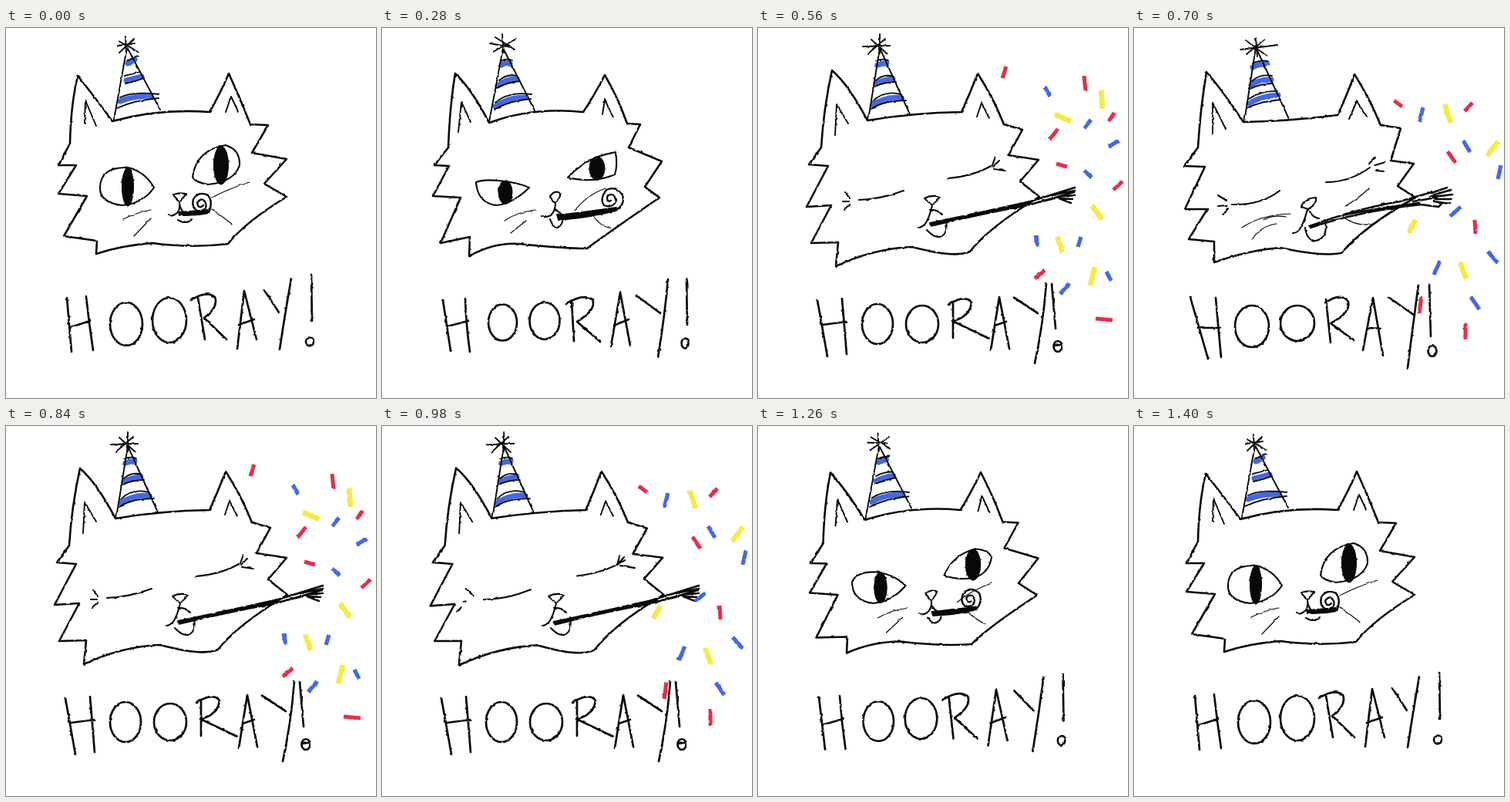
Animation, 480 px wide and 480 px high, one loop 1.54 s. Source, as an HTML page:

```html
<!DOCTYPE html>
<html lang="en">
<head>
<meta charset="utf-8">
<title>Hooray!</title>
<style>
html, body { margin: 0; width: 100%; height: 100%; overflow: hidden; background: #fff; }
svg { display: block; width: 100%; height: 100%; }
path { fill: none; stroke: #080808; stroke-linecap: round; stroke-linejoin: round; }
.head { stroke-width: 2.6; }
.hat, .ears { stroke-width: 1.9; }
.bands { stroke: #4468e6; stroke-width: 7; }
.lines { stroke-width: 1.8; }
.eyes, .face { stroke-width: 2.1; }
.pupils { fill: #080808; stroke-width: 1; }
.whiskers { stroke-width: 1.2; }
.horn { fill: #080808; stroke-width: 1.8; }
.curl { stroke-width: 2.3; }
.tassel { stroke-width: 2.5; }
.word { stroke-width: 2.7; }
.red { stroke: #ec2c46; stroke-width: 5; }
.blue { stroke: #4169ec; stroke-width: 5.2; }
.yellow { stroke: #f7ea42; stroke-width: 6.8; }
.red, .blue, .yellow { stroke-linecap: butt; }

/* Six poses play forwards and back, 140 ms each */
g { visibility: hidden; filter: url(#ink); animation: 1540ms step-end infinite; }
g:nth-of-type(1) { animation-name: rest; }
g:nth-of-type(2) { animation-name: wake; }
g:nth-of-type(3) { animation-name: squint; }
g:nth-of-type(4) { animation-name: blow; }
g:nth-of-type(5) { animation-name: party; }
g:nth-of-type(6) { animation-name: peak; }
@keyframes rest { 0%, 90.9% { visibility: visible } 9.09%, 100% { visibility: hidden } }
@keyframes wake { 0%, 18.18%, 90.9%, 100% { visibility: hidden } 9.09%, 81.81% { visibility: visible } }
@keyframes squint { 0%, 27.27%, 81.81%, 100% { visibility: hidden } 18.18%, 72.72% { visibility: visible } }
@keyframes blow { 0%, 36.36%, 72.72%, 100% { visibility: hidden } 27.27%, 63.63% { visibility: visible } }
@keyframes party { 0%, 45.45%, 63.63%, 100% { visibility: hidden } 36.36%, 54.54% { visibility: visible } }
@keyframes peak { 0%, 54.54%, 100% { visibility: hidden } 45.45% { visibility: visible } }
</style>
</head>
<body>
<svg viewBox="0 0 480 480" role="img" aria-label="A party cat: HOORAY!">
  <filter id="ink" filterUnits="userSpaceOnUse" x="0" y="0" width="480" height="480" color-interpolation-filters="sRGB">
    <feTurbulence type="fractalNoise" baseFrequency="0.15" numOctaves="2" seed="4" result="noise"/>
    <feDisplacementMap in="SourceGraphic" in2="noise" scale="2.5" xChannelSelector="R" yChannelSelector="G"/>
  </filter>
</svg>
<script>
const oval = (x, y, rx, ry) =>
  `M${x} ${y - ry}a${rx} ${ry} 0 0 0 0 ${2 * ry}a${rx} ${ry} 0 0 0 0 ${-2 * ry}`;

const rest = {
  head: 'M93 62Q84 100 83 150L68 178L91 178L68 215L105 218L75 270L118 276L117 293Q150 282 190 279Q240 286 288 280Q310 252 364 219L335 202L364 170L319 162L340 126L317 125Q303 90 289 59Q278 85 264 109Q200 104 138 121Q114 88 93 62',
  bands: 'M158 46Q163 44 167 41M156 68Q165 66 176 63M148 95Q165 88 188 88',
  lines: 'M157 42Q163 40 171 37M154 62Q163 60 174 57M155 72Q167 70 179 65M148 90Q165 82 198 86M144 104Q165 94 198 91',
  hat: 'M140 119L157 25L200 106M155 11L156 33M146 17L172 31M166 14L147 32M145 23L167 20',
  ears: 'M102 124L103 94L117 127M285 109L292 89L301 108',
  eyes: 'M122 205Q124 180 158 181Q180 186 192 207Q178 228 150 230Q120 226 122 205M242 193Q247 158 285 152Q304 158 303 178Q296 200 262 203Q245 200 242 193',
  pupils: oval(158, 206, 7.5, 25) + oval(279, 178, 9.5, 25),
  whiskers: 'M152 248Q168 240 187 236M166 270L188 247M267 220Q290 208 316 200M267 235Q280 244 294 255',
  face: 'M217 217Q222 213 233 215Q231 220 225 225ZM225 225Q227 238 219 242Q214 245 211 242M226 232L229 238M222 249Q228 252 232 252Q238 252 241 248',
  horn: 'M224 239Q240 238 262 236L263 240Q244 244 225 243Z',
  curl: 'M263 240Q269 225 262 217Q250 211 243 222Q240 234 250 238Q262 236 259 227Q254 218 248 227Q250 236 256 230',
  word: 'M79 350L85 420M104 349Q108 385 113 418M84 388L109 380' + oval(156, 384, 21, 28) + oval(212, 379, 22, 29) +
    'M249 350L258 404M240 353Q260 340 271 349Q276 362 257 376L286 404M300 416L309 341L325 404M302 385L322 378M335 340L354 369M370 325Q362 370 355 417M396 320L397 380' + oval(394, 407, 5, 5.5)
};

const squint = {
  head: 'M95 59Q88 100 86 155L68 178L87 179L66 218L102 220L76 279L114 271L113 296Q145 278 178 280Q235 286 266 286Q290 268 360 220L341 206L363 173L320 155L335 125L318 124Q306 90 289 61Q274 90 261 109Q195 102 139 123Q117 80 95 59',
  bands: 'M155 48Q161 44 166 46M150 75Q160 66 175 66M147 102Q162 90 187 90',
  lines: 'M154 43Q161 39 169 42M152 68Q162 59 175 62M149 78Q163 70 179 69M147 97Q163 82 194 86M146 106Q163 95 193 92',
  hat: 'M139 122L157 26L198 107M156 8L158 32M147 12L172 28M174 14L144 31M140 20L168 25',
  ears: 'M99 135L103 96L115 122M286 112L289 93L300 116',
  eyes: 'M122 200Q132 196 151 198Q175 200 191 207Q170 228 148 230Q124 227 122 200M241 194Q260 174 280 167Q292 163 303 161Q306 178 302 190Q275 202 241 194',
  pupils: oval(160, 213, 9, 15.5) + oval(279, 182, 10, 15.5),
  whiskers: 'M159 250Q178 237 200 237M167 266L187 250M250 237Q265 217 290 208M275 245Q283 257 297 260',
  face: 'M218 219Q222 211 229 213Q235 217 224 227ZM225 227Q225 237 219 243Q212 247 207 244M225 235L233 242M218 248Q222 260 228 259Q235 255 234 247',
  horn: 'M227 243Q262 239 304 233L304 237Q265 247 229 249Z',
  curl: 'M302 237Q316 230 312 217Q304 204 291 210Q282 222 288 230Q298 234 303 226Q303 213 293 217Q290 225 297 225',
  word: 'M79 353L89 419M108 351Q109 385 114 420M85 387L112 380' + oval(156.5, 382, 18.5, 23.5) + oval(211, 380, 19.5, 24) +
    'M246 353L249 407M239 358Q260 344 273 352Q279 365 253 381L283 407M297 413L309 343L322 412M301 386L320 378M330 347L361 370M371 326Q366 380 358 427M395 326L396 385' + oval(393, 409, 4.5, 6.5)
};

const party = {
  head: 'M96 55Q85 105 82 155L66 177L91 179L63 232L95 230L69 279L104 278L101 309Q150 286 200 284Q255 299 275 290Q300 258 365 219L340 199L364 171L325 165L343 132L319 125Q305 90 285 59Q275 85 264 109Q200 110 142 120Q118 74 96 55',
  bands: 'M155 48Q161 46 167 45M153 72Q163 67 175 66M149 100Q164 89 185 90',
  lines: 'M153 43Q161 39 169 42M153 68Q163 59 176 63M152 76Q163 70 179 70M149 95Q163 80 186 86M147 105Q163 94 192 94',
  hat: 'M143 119L158 26L197 112M158 8L158 33M147 15L168 34M165 14L142 34M136 24L171 23',
  ears: 'M100 139L102 99L117 124M284 115L290 97L300 117',
  eyes: 'M131 223Q160 222 189 211M246 195Q280 192 302 179M113 213L119 221M110 225L118 225M112 235L119 229M304 178L308 167M305 180L313 172M306 183L320 185',
  face: 'M216 221Q225 216 236 219Q232 225 226 230ZM226 230Q222 247 217 254Q212 259 208 259M223 236Q232 235 239 242M244 248Q247 268 236 271Q228 272 219 262',
  horn: 'M223 253Q290 239 352 225L352 230Q290 241 225 257Z',
  tassel: 'M350 226L411 207M350 230L410 213M352 229L385 221M386 216L411 211M388 219L411 217M390 221L408 222M393 222L406 227',
  word: 'M77 353L90 426M109 351Q112 385 115 424M84 385L115 381' + oval(155, 384, 20, 26) + oval(213, 384, 21, 24) +
    'M253 355L253 402M247 359Q268 345 277 356Q275 375 252 380L300 403M302 418L313 349L326 416M307 386L322 381M331 349L363 370M374 331Q370 385 359 435M381 332L386 390' + oval(389, 413, 5.5, 7) + 'M385 412L392 411',
  red: 'M322 50l-5 15M423 62l2 20M462 110l-7 11M389 131l-11 14M387 176l14 4M473 199l-12 11M372 314l-13 11M438 377l22 2',
  blue: 'M372 76l7 13M432 119l-9 11M468 146l-13 8M423 185l10 9M360 269l3 15M419 271l-4 13M404 331l-12 14M452 316l6 12',
  yellow: 'M445 81l2 24M385 112l21 9M433 230l13 18M388 270l7 22M437 310l-6 24'
};

const peak = {
  head: 'M94 57Q86 105 83 155L65 179L92 180L66 235L95 235L71 274L104 277L104 304Q150 288 190 285Q245 297 269 292Q300 256 365 220L342 205L363 176L333 172L346 130L320 126Q305 90 286 60Q276 88 264 113Q200 121 142 122Q114 80 94 57',
  bands: 'M154 51Q163 46 173 46M152 74Q163 66 178 67M149 98Q165 88 187 87',
  lines: 'M154 46Q163 41 174 43M153 69Q163 59 179 62M150 79Q165 72 180 72M149 92Q165 81 186 82M146 104Q165 95 190 93',
  hat: 'M143 122L158 25L201 118M158 13L160 37M145 16L172 36M169 15L146 34M138 28L186 22',
  ears: 'M102 138L102 97L119 131M279 118L289 95L302 115',
  eyes: 'M127 229Q165 230 189 211M249 200Q280 200 306 181M109 217L120 224M109 231L121 230M116 242L122 234M305 176L313 168M313 178L326 174M314 185L324 186',
  whiskers: 'M140 259Q165 242 203 241M153 275Q163 257 185 254M167 249Q180 242 198 245M274 231Q290 222 305 208M274 247Q290 258 312 254',
  face: 'M217 232Q220 221 236 220Q238 228 226 235ZM225 235Q220 255 214 262Q210 266 206 266M228 238Q232 246 240 247M222 259Q224 276 236 276Q252 272 248 251',
  tassel: 'M228 257Q290 234 345 225L386 213M229 259Q290 238 372 229L395 232M270 243Q320 233 370 227M386 214L406 207M384 218L411 210M388 219L413 216M390 222L412 222M389 225L410 228M362 225L393 220M395 232L400 227',
  word: 'M73 349L96 429M106 350Q109 385 113 427M83 389L112 389' + oval(153, 387, 22, 27) + oval(212, 383, 22, 23) +
    'M249 352L255 408M248 357Q268 342 278 355Q281 370 255 383L285 405M297 418L310 350L323 425M304 389L320 390M330 349L364 373M369 333Q362 385 355 441M383 333L385 400' + oval(387, 419, 5.5, 7),
  red: 'M337 94l11 8M439 97l-10 11M407 160l10 15M442 249l1 18M373 348l-3 22M430 383l0 21',
  blue: 'M375 103l-5 19M427 146l9 15M476 178l-4 18M424 232l-14 12M397 302l-8 18M459 290l13 15M437 349l11 16',
  yellow: 'M403 99l8 24M472 147l-14 19M365 249l-9 17M423 304l8 21'
};

const numbers = /-?[\d.]+/g;

// Blend two drawings; parts built differently take the second one's shape
function mix(a, b, t) {
  const out = {};
  for (const part in b) {
    const from = (a[part] || '').match(numbers) || [];
    const same = from.length === b[part].match(numbers).length;
    let i = 0;
    out[part] = same ? b[part].replace(numbers, n => +(+from[i] + (n - from[i++]) * t).toFixed(2)) : b[part];
  }
  return out;
}

const shift = (d, dx, dy) => d.replace(/M(\d+) (\d+)/g, (_, x, y) => `M${+x + dx} ${+y + dy}`);
const blow = mix(squint, party, 1.1);
for (const colour of ['red', 'blue', 'yellow']) blow[colour] = shift(peak[colour], -4, -16);

const order = ['head', 'bands', 'lines', 'hat', 'ears', 'eyes', 'pupils', 'whiskers', 'face', 'horn', 'curl', 'tassel', 'word', 'red', 'blue', 'yellow'];
const draw = pose => '<g>' + order.filter(p => pose[p]).map(p => `<path class="${p}" d="${pose[p]}"/>`).join('') + '</g>';
document.querySelector('svg').innerHTML +=
  [rest, mix(rest, squint, 0.5), squint, blow, party, peak].map(draw).join('');
</script>
</body>
</html>
```
